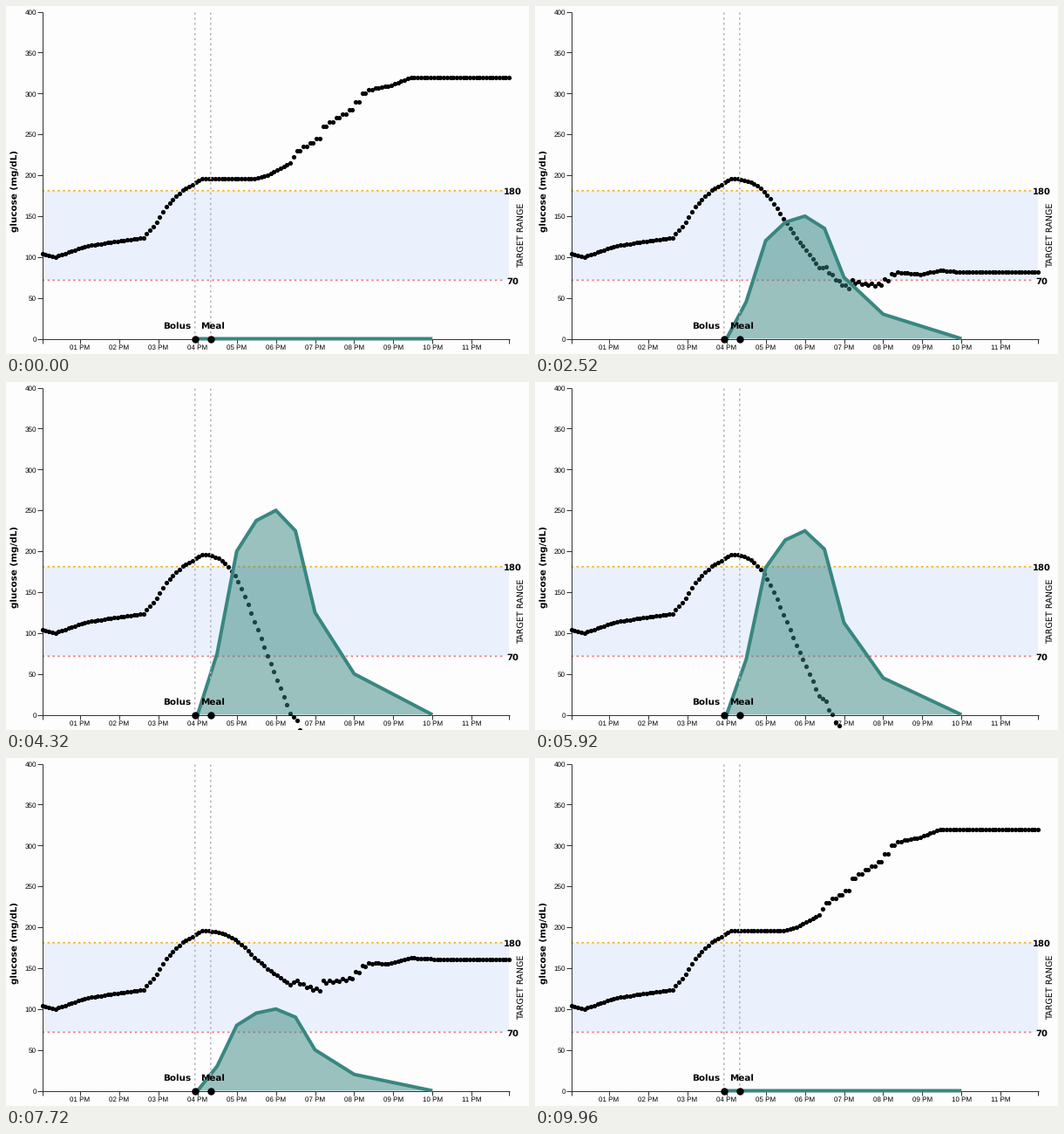
Recreate the animation shown at these times as a matplotlib script. Size 600 by 399 pixels, loop 10 s.

```python
import numpy as np
import matplotlib.pyplot as plt
from matplotlib.animation import FuncAnimation

plt.rcParams["text.hinting"] = "none"

W, H, DPI = 600, 399, 100
STEP_MS, LOOP_MS = 40, 10000
PT = 72 / DPI  # points per pixel
LEFT, RIGHT = 41.7, 577
TEAL, AXIS = "#388780", "#333333"

# Times in ms at which the bolus grows or shrinks by one unit
RISES = [40, 840, 1440, 1640, 1960, 2280, 2960, 3280, 3640, 4000, 4520]
FALLS = [5040, 5480, 5960, 6120, 6560, 7120, 7600, 8040, 8600, 9320, 9960]

# Insulin activity per unit, by hour
HOURS = np.array([4, 4.5, 5, 5.5, 6, 6.5, 7, 8, 10])
ACTIVITY = 25 * np.array([0, .3, .8, .95, 1, .9, .5, .2, 0])
DROP_RATE, LAG = 0.6, 0.22

# Turning points of glucose without insulin: (reading number, mg/dL)
READINGS = 144
TURNS = [(0, 104), (4, 100), (13, 113), (24, 120), (31, 123.5), (35, 142),
         (38, 162), (43, 182), (49, 195.5), (65, 195.5), (69, 200),
         (76, 215), (78, 230), (84, 245), (86, 260), (94, 280), (98, 300),
         (100, 305), (107, 310), (113, 320)]


def x_of(hour):
    return 85 + 44.92 * (hour - 1)


def hour_at(x):
    return 1 + (x - 85) / 44.92


def y_of(value):
    return 381.5 - 0.9372 * value


def base_glucose():
    index = np.arange(READINGS)
    # The evening climb repeats every reading once
    held = np.where((index >= 78) & (index < 102), index - index % 2, index)
    return np.interp(held, *zip(*TURNS))


def total_drop(hours):
    fine = np.linspace(HOURS[0], HOURS[-1], 721)
    rate = np.interp(fine, HOURS, ACTIVITY)
    area = np.cumsum((rate[1:] + rate[:-1]) / 2 * np.diff(fine))
    return DROP_RATE * np.interp(hours - LAG, fine, np.r_[0, area])


def units_at(ms):
    return np.searchsorted(RISES, ms, "right") - np.searchsorted(FALLS, ms, "right")


dot_x = np.linspace(LEFT, RIGHT, READINGS)
base = base_glucose()
drop = total_drop(hour_at(dot_x))

fig = plt.figure(figsize=(W / DPI, H / DPI), dpi=DPI, facecolor="#fefdfe")
ax = fig.add_axes([0, 0, 1, 1])
ax.set(xlim=(0, W), ylim=(H, 0))
ax.axis("off")


def line(xs, ys, color=AXIS, width=1, z=2, **style):
    return ax.plot(xs, ys, color=color, lw=width * PT, zorder=z,
                   solid_capstyle="butt", dash_capstyle="butt", **style)[0]


def dotted(xs, ys, color, width, z):
    line(xs, ys, color, width, z, snap=False,
         linestyle=(0, (2.4 / width, 3.5 / width)))


def disc(xs, ys, size, z):
    return ax.plot(xs, ys, "o", color="black", ms=size * PT, mew=0,
                   zorder=z, snap=False)[0]


def label(x, y, text, size, font="DejaVu Sans", **style):
    style = {"ha": "center", "va": "center_baseline", "zorder": 8, **style}
    ax.text(x, y, text, fontsize=size * PT, family=font, **style)


# Target range
ax.fill_between([LEFT, RIGHT], 211.7, 314.3, color="#eaf1fc", lw=0, zorder=0)
for y, color, text, end in [(211.8, "#f5ae1e", "180", 571),
                            (314.4, "#ee7680", "70", 571)]:
    dotted([LEFT, end], [y, y], color, 1.7, 1)
    label(581, y + .2, text, 10, weight="bold")
label(590.8, 263, "TARGET RANGE", 9.7, rotation=90, va="center")
label(9.8, 212.3, "glucose (mg/dL)", 10.4, rotation=90, va="center",
      weight="bold")

# Axes
line([41.5, 41.5], [y_of(400), y_of(0)])
line([41, 578], [y_of(0)] * 2)
for value in range(0, 401, 50):
    line([36, 42], [y_of(value)] * 2)
    label(35, y_of(value) + .3, str(value), 8.2, "Liberation Sans", ha="right")
for x in [LEFT, RIGHT] + [x_of(h) for h in range(1, 12)]:
    line([x, x], [382, 387])
for hour in range(1, 12):
    label(x_of(hour), 394.2, f"{hour:02d} PM", 8, "Liberation Sans",
          va="baseline")

# Events
for x, name, name_x in [(216.7, "Bolus", 196), (234.8, "Meal", 237)]:
    dotted([x, x], [y_of(0), 7], "#b4b4b8", 1.6, 6)
    disc(x, y_of(0), 8.4, 7)
    label(name_x, 366, name, 10.4, weight="bold")

dots = disc([], [], 5.2, 3)
area, = ax.fill([0], [0], color=TEAL, alpha=0.5, lw=0, zorder=4)
curve = line([], [], TEAL, 4, 5, solid_joinstyle="miter", snap=False)


def draw(frame):
    units = units_at(frame * STEP_MS)
    dots.set_data(dot_x, y_of(base - units * drop))
    points = np.column_stack([x_of(HOURS), y_of(units * ACTIVITY)])
    area.set_xy(points)
    curve.set_data(*points.T)
    return dots, area, curve


anim = FuncAnimation(fig, draw, frames=LOOP_MS // STEP_MS, interval=STEP_MS,
                     repeat=True, repeat_delay=0)
plt.show()
```
